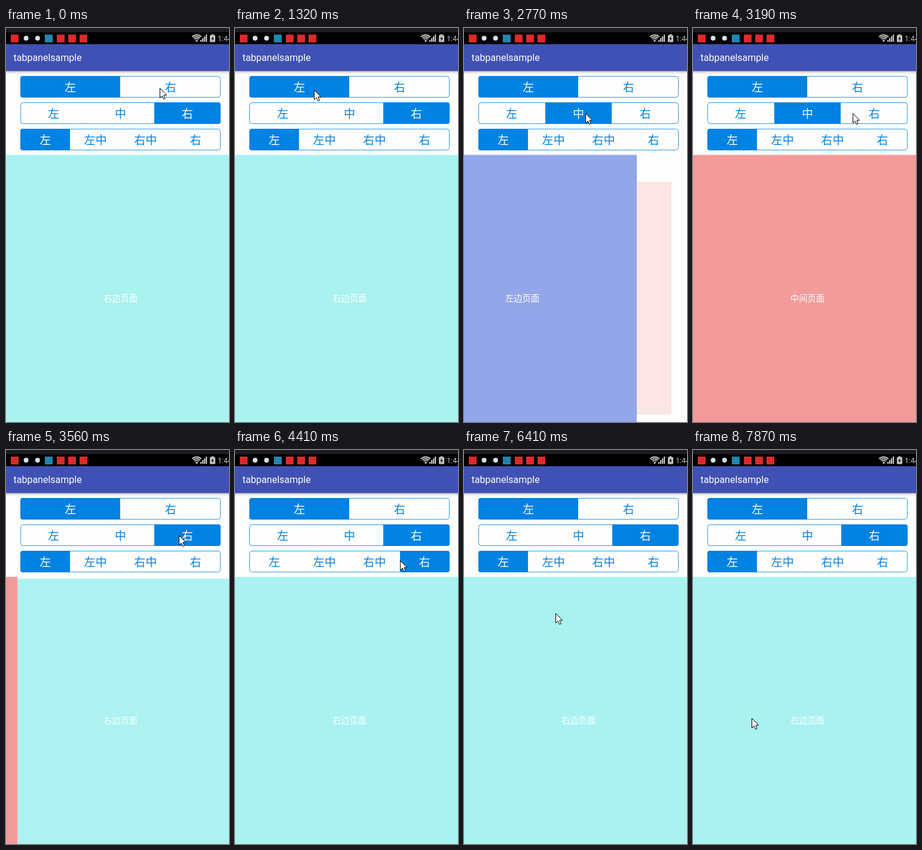
Write an HTML page with a canvas that moves like this. It is 373x657 px and loops after 7990 ms.

```html
<!DOCTYPE html>
<html lang="zh-CN">
<head>
<meta charset="utf-8">
<title>Tab panels</title>
<style>
  html, body { margin: 0; width: 100%; height: 100%; overflow: hidden; background: #fdfdfd; }
  canvas { display: block; width: 373px; height: 657px; }
</style>
</head>
<body>
<canvas id="stage"></canvas>
<script>
const W = 373, H = 657, LOOP = 7990, STEP = 135;
const BLUE = '#0082e2', PAPER = '#fdfdfd';
const CJK = '"Noto Sans CJK SC", "Noto Sans CJK", sans-serif';
const LATIN = 'Roboto, sans-serif';

const canvas = document.getElementById('stage');
const ctx = canvas.getContext('2d');
const dpr = window.devicePixelRatio || 1;
canvas.width = W * dpr;
canvas.height = H * dpr;

// Pointer strokes: first step, last step, then the point reached
const START = [257, 100];
const STROKES = [
  [150, 150, 271, 100], [890, 1040, 132, 103], [1440, 1990, 98, 142],
  [2250, 2490, 203, 142], [3050, 3320, 289, 142], [3680, 3680, 308, 165],
  [3830, 3980, 313, 184], [4410, 4560, 238, 184], [5020, 5320, 151, 186],
  [5600, 5870, 69, 189], [6150, 6710, 307, 424], [6850, 6990, 266, 431],
  [7140, 7440, 61, 457], [7590, 7590, 116, 458], [7870, 7870, 98, 447]
];

// Segmented bars; picks are time, selected index
const BARS = [
  { y: 80, labels: ['左', '右'], picks: [[0, 0], [460, 1], [1320, 0]] },
  { y: 124, labels: ['左', '中', '右'], picks: [[0, 2], [2130, 0], [2770, 1], [3560, 2]] },
  { y: 168, labels: ['左', '左中', '右中', '右'],
    picks: [[0, 0], [4260, 3], [4870, 2], [5470, 1], [6020, 0]] }
];

const PAGES = [['左边页面', '#92a6e9'], ['中间页面', '#f29b9a'], ['右边页面', '#a9f2f0']];
const PAGE = { w: 383, h: 477.8, top: 211.6 };

// Pager scrolls, redrawn in coarse steps; "lead" is the progress at the first one
const SCROLLS = [
  { at: 2130, step: 120, lead: 0.1665, from: 2, to: 0 },
  { at: 2770, step: 150, lead: 0.0547, from: 0, to: 1 },
  { at: 3560, step: 120, lead: 0.4517, from: 1, to: 2 }
];

function pointerAt(t) {
  let [x, y] = START;
  for (const [first, last, toX, toY] of STROKES) {
    if (t < first) break;
    const n = Math.round((last - first) / STEP) + 1;
    const gap = n > 1 ? (last - first) / (n - 1) : STEP;
    const k = Math.min(1, (Math.floor((t - first) / gap) + 1) / n);
    const ease = k * k * (3 - 2 * k);
    x += (toX - x) * ease;
    y += (toY - y) * ease;
  }
  return [Math.round(x), Math.round(y)];
}

function pickAt(picks, t) {
  return picks.filter(([at]) => at <= t).pop()[1];
}

function scrollAt(t) {
  let pos = 2;
  for (const { at, step, lead, from, to } of SCROLLS) {
    if (t < at) break;
    const length = 100 + 90 * Math.abs(to - from);
    const elapsed = Math.floor((t - at) / step) * step;
    const k = Math.min(1, lead + elapsed / length);
    pos = from + (to - from) * (1 - Math.pow(1 - k, 5));
  }
  return pos;
}

function rect(x, y, w, h, color) {
  ctx.fillStyle = color;
  ctx.fillRect(x, y, w, h);
}

function round(x, y, w, h, r) {
  ctx.beginPath();
  ctx.roundRect(x, y, w, h, r);
}

function dot(x, y, r, color) {
  ctx.beginPath();
  ctx.arc(x, y, r, 0, Math.PI * 2);
  ctx.fillStyle = color;
  ctx.fill();
}

function polygon(points) {
  ctx.beginPath();
  for (const [x, y] of points) ctx.lineTo(x, y);
  ctx.closePath();
}

function text(str, x, y, font, color, align = 'center') {
  ctx.font = font;
  ctx.fillStyle = color;
  ctx.textAlign = align;
  ctx.fillText(str, x, y);
}

// Leaving pages slide left; the next one grows and fades in beneath
function drawPages(scroll) {
  const cx = PAGE.w / 2, cy = PAGE.top + PAGE.h / 2;
  for (let i = PAGES.length - 1; i >= 0; i--) {
    const pos = i - scroll;
    if (Math.abs(pos) >= 1) continue;
    const depth = Math.max(0, pos);
    const scale = 1 - depth * 0.25;
    ctx.save();
    ctx.globalAlpha = 1 - depth;
    ctx.translate(cx + Math.round(Math.min(0, pos) * PAGE.w), cy);
    ctx.scale(scale, scale);
    rect(-cx, -PAGE.h / 2, PAGE.w, PAGE.h, PAGES[i][1]);
    text(PAGES[i][0], 0, 5.4, '500 14.3px ' + CJK, '#fff');
    ctx.restore();
  }
}

function drawBar({ y, labels, picks }, t) {
  const x = 24, w = 335, h = 36, n = labels.length;
  const picked = pickAt(picks, t);
  const edge = i => x + w * i / n;
  const left = Math.ceil(edge(picked)), right = Math.floor(edge(picked + 1));

  ctx.strokeStyle = BLUE;
  ctx.lineWidth = 0.8;
  round(x + 0.5, y + 0.5, w - 1, h - 1, 4);
  ctx.stroke();

  ctx.save();
  round(x, y, w, h, 4);
  ctx.clip();
  rect(left, y, right - left, h, BLUE);
  ctx.restore();

  for (let i = 1; i < n; i++) {
    if (i !== picked && i !== picked + 1) rect(Math.floor(edge(i)), y + h - 1, 1, 1, '#14527f');
  }
  labels.forEach((label, i) => {
    text(label, edge(i + 0.5), y + 26, '19px ' + CJK, i === picked ? '#fff' : BLUE);
  });
}

function drawStatus() {
  const grey = '#c4c4c4';
  rect(0, 0, W, 27, '#000');
  rect(0, 0, W, 7, '#1b1c20');

  // Seven notification marks, evenly spaced
  for (let i = 0; i < 7; i++) {
    const x = 14.5 + i * 19.15;
    if (i === 1 || i === 2) dot(x, 17, 4, '#d5e3e6');
    else rect(Math.round(x - 6.5), 11, 13, 13, i === 3 ? '#2186b0' : '#dc2a2b');
  }

  ctx.strokeStyle = grey;
  ctx.lineWidth = 2;
  for (let r = 4.5; r < 11; r += 3) {
    ctx.beginPath();
    ctx.arc(319, 22, r, -Math.PI * 0.76, -Math.PI * 0.24);
    ctx.stroke();
  }
  dot(319, 21.3, 1.7, grey);

  for (let i = 0; i < 4; i++) rect(325 + i * 3, 20 - i * 3, 2.2, 3 + i * 3, grey);

  rect(343.5, 10.5, 4, 2, grey);
  round(341, 12, 9, 11.5, 1);
  ctx.fillStyle = grey;
  ctx.fill();
  polygon([[346.5, 13.5], [343, 18.3], [345.2, 18.3], [344.5, 22], [348, 17], [345.8, 17]]);
  ctx.fillStyle = '#111';
  ctx.fill();

  text('1:44', 354, 22, '12.5px ' + LATIN, grey, 'left');
}

function drawHeader() {
  const shade = ctx.createLinearGradient(0, 71, 0, 77);
  shade.addColorStop(0, 'rgba(0,0,0,.4)');
  shade.addColorStop(0.4, 'rgba(0,0,0,.13)');
  shade.addColorStop(1, 'rgba(0,0,0,0)');
  rect(0, 71, W, 6, shade);
  rect(0, 27, W, 44.6, '#3f51b5');
  text('tabpanelsample', 12.5, 55, '16px ' + LATIN, '#fff', 'left');
}

function drawPointer([x, y]) {
  ctx.save();
  ctx.translate(x + 0.5, y + 0.5);
  polygon([[0, 0], [0, 16], [3.7, 12.6], [6.2, 18.2], [8.8, 17.1], [6.4, 11.5], [11.2, 11.5]]);
  ctx.fillStyle = '#fff';
  ctx.fill();
  ctx.strokeStyle = '#000';
  ctx.lineWidth = 1;
  ctx.stroke();
  ctx.restore();
}

function draw(t) {
  ctx.setTransform(dpr, 0, 0, dpr, 0, 0);
  rect(0, 0, W, H, PAPER);
  drawPages(scrollAt(t));
  drawStatus();
  drawHeader();
  for (const bar of BARS) drawBar(bar, t);
  drawPointer(pointerAt(t));
}

let origin;
function tick(now) {
  if (origin === undefined) origin = now;
  draw((now - origin) % LOOP);
  requestAnimationFrame(tick);
}
draw(0);
requestAnimationFrame(tick);
</script>
</body>
</html>
```
